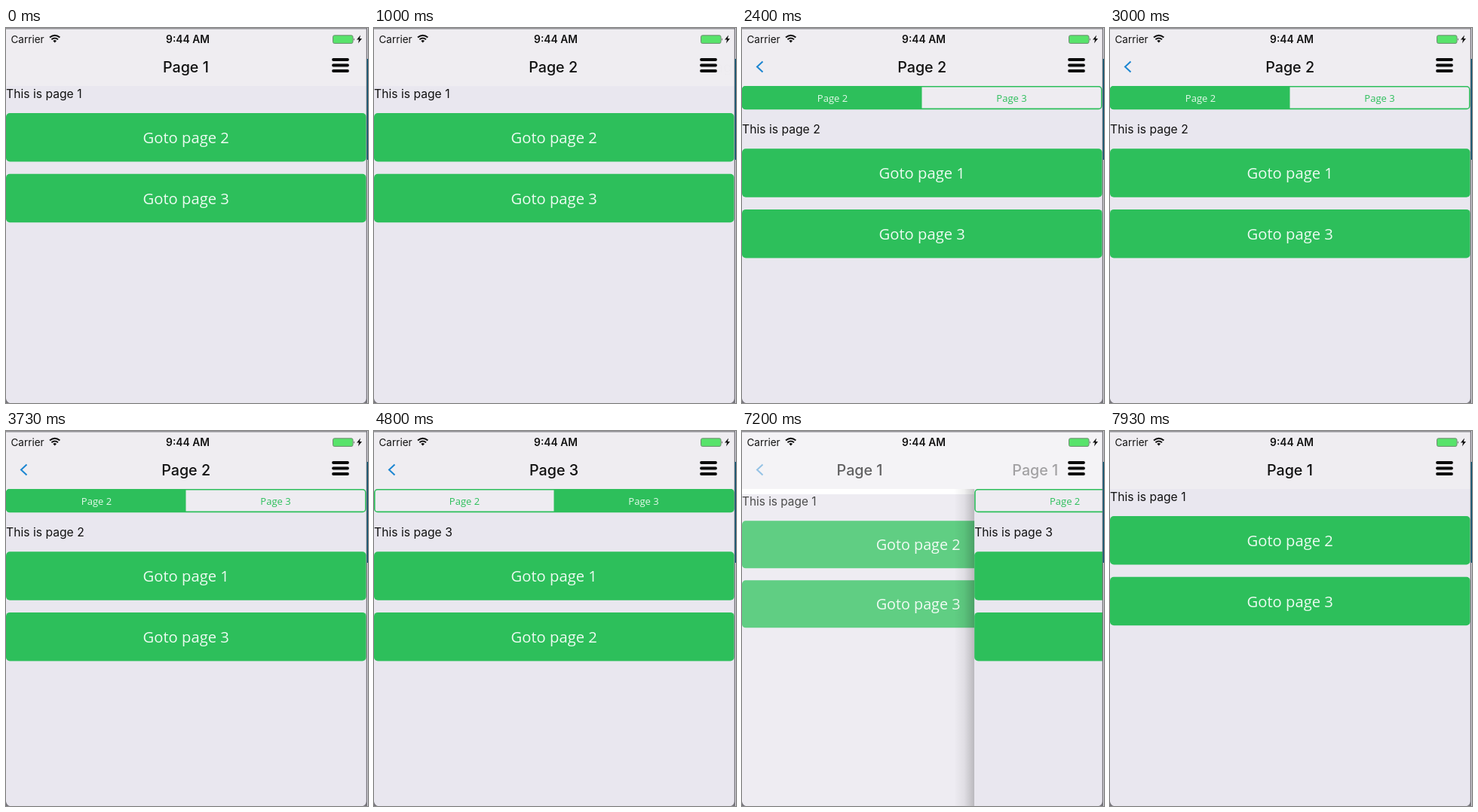
Recreate the animation shown at these times as an HTML page. Size 480 by 498 pixels, loop 8 s.

```html
<!DOCTYPE html>
<html lang="en">
<head>
<meta charset="utf-8">
<title>Page navigation</title>
<style>
html, body { margin: 0; width: 100%; height: 100%; overflow: hidden; background: #e9e7ef; }
svg { display: block; width: 100%; height: 100%; }
text { font-family: Inter, Arial, sans-serif; fill: #111; }
.mid { text-anchor: middle; }
.title { font-size: 19.7px; font-weight: 500; }
.body { font-size: 15.7px; }
.button, .tab { font-family: "Open Sans", "Noto Sans", sans-serif; }
.button { font-size: 20.2px; fill: #ecfbf1; }
.tab { font-size: 13px; }
</style>
</head>
<body>
<svg id="stage" viewBox="0 0 480 498">
  <defs>
    <clipPath id="content"><rect y="77" width="480" height="421"/></clipPath>
    <linearGradient id="shade">
      <stop offset="0" stop-opacity="0"/>
      <stop offset=".5" stop-opacity=".06"/>
      <stop offset="1" stop-opacity=".22"/>
    </linearGradient>
  </defs>

  <g clip-path="url(#content)">
    <rect width="480" height="498" fill="#fff"/>
    <g id="home"></g>
    <g id="detail">
      <rect id="shadow" x="-27" y="77" width="27" height="421" fill="url(#shade)"/>
      <g id="detailBody"></g>
    </g>
  </g>

  <rect width="480" height="77" fill="#efedf1"/>
  <rect id="wash" width="480" height="77" fill="#fff"/>
  <text id="oldTitle" class="mid title" y="58.5"></text>
  <text id="newTitle" class="mid title" y="58.5"></text>
  <path id="back" d="M27.5 44.5L20 51.5L27.5 58.5" fill="none" stroke="#1c86d1" stroke-width="2"/>
  <path d="M434 42H453M434 49.5H453M434 57H453" stroke="#0b0b0b" stroke-width="3.8" stroke-linecap="round"/>

  <text x="6.5" y="20" font-size="13.5">Carrier</text>
  <g fill="none" stroke="#111" stroke-width="2">
    <path d="M58 12.6Q64.7 7 71.4 12.6M60.4 15.3Q64.7 11.8 69 15.3"/>
    <path d="M62.3 17L64.7 19.6L67.1 17Q64.7 15.2 62.3 17Z" fill="#111" stroke="none"/>
  </g>
  <text class="mid" x="241" y="20" font-size="13.8" font-weight="600">9:44 AM</text>
  <rect x="433.5" y="9.8" width="26.5" height="10.6" rx="2" fill="#58e36b" stroke="#6f8a73"/>
  <path d="M461.3 13.2Q463 15 461.3 17Z" fill="#333"/>
  <path d="M470 9.5L465 15.6H468L467 20.3L472 14H469Z" fill="#111"/>

  <rect width="480" height="1.6" fill="#96959a"/>
  <rect x="477.7" width="1.3" height="498" fill="#77767c"/>
  <rect x="479" width="1" height="498" fill="#d5d4da"/>
  <rect x="478.6" y="41" width="1.4" height="134" fill="#0b5574"/>
  <path d="M0 492V498H5Q1 497 0 492ZM478 492V498H473Q477 497 478 492Z" fill="#77767c"/>
</svg>
<script>
const LOOP = 8000, GREEN = '#2dbf5b', SLIDE = 600;
const PUSH = 1000, SWITCH = 4000, POP = 6960;
const $ = id => document.getElementById(id);
const set = (id, attrs) => {
  for (const key in attrs) $(id).setAttribute(key, attrs[key]);
};

const button = (y, page) => `
  <rect y="${y}" width="477.6" height="64.5" rx="5" fill="${GREEN}"/>
  <text class="mid button" x="238.7" y="${y + 40}">Goto page ${page}</text>`;

const content = (page, top, links) => `
  <rect y="77" width="480" height="900" fill="#e9e7ef"/>
  <text class="body" x="0" y="${top + 15.8}">This is page ${page}</text>
  ${links.map((link, i) => button(top + 36 + i * 80.7, link)).join('')}`;

function tabs(active) {
  const label = (page, x) =>
    `<text class="mid tab" x="${x}" y="98" style="fill:${page === active ? '#e4f9ea' : GREEN}">Page ${page}</text>`;
  const fill = active === 2 ? 'M238.5 77H5Q0 77 0 82V103Q0 108 5 108H238.5Z'
                            : 'M238.5 77H472.5Q477.5 77 477.5 82V103Q477.5 108 472.5 108H238.5Z';
  return `<rect x=".8" y="77.8" width="476" height="29.6" rx="4" fill="#eeecf1" stroke="${GREEN}" stroke-width="1.6"/>
    <path d="${fill}" fill="${GREEN}"/>${label(2, 120)}${label(3, 357.5)}`;
}

const clamp = v => Math.max(0, Math.min(1, v));
const easeOut = v => 1 - (1 - v) ** 2;

$('home').innerHTML = content(1, 77, [2, 3]);
let shown = 0;

function showDetail(page) {
  if (page === shown) return;
  shown = page;
  $('detailBody').innerHTML = content(page, 124.2, [1, 5 - page]) + tabs(page);
}

function draw(t) {
  const p = easeOut(clamp((t - PUSH) / SLIDE)) - easeOut(clamp((t - POP) / SLIDE));
  const scale = 1 - 0.06 * p;
  const detail = t < SWITCH ? 2 : 3;
  // Both toolbars share one title while sliding
  const title = 'Page ' + (t < PUSH || t >= POP ? 1 : detail);

  showDetail(detail);
  set('home', { transform: `translate(0 ${404 * (1 - scale)}) scale(${scale})`, opacity: 1 - 0.69 * p });
  set('detail', { transform: `translate(${480 * (1 - p)} 0)` });
  set('shadow', { opacity: clamp(p * 3) });
  set('wash', { opacity: 1.4 * p * (1 - p) });
  set('oldTitle', { x: 238.4 - 230 * p, opacity: 1 - p });
  set('newTitle', { x: 238.6 + 234 * (1 - p), opacity: p });
  set('back', { opacity: clamp(p * 1.25) });
  $('oldTitle').textContent = $('newTitle').textContent = title;
}

const start = performance.now();
function tick() {
  draw((performance.now() - start) % LOOP);
  requestAnimationFrame(tick);
}
tick();
</script>
</body>
</html>
```
